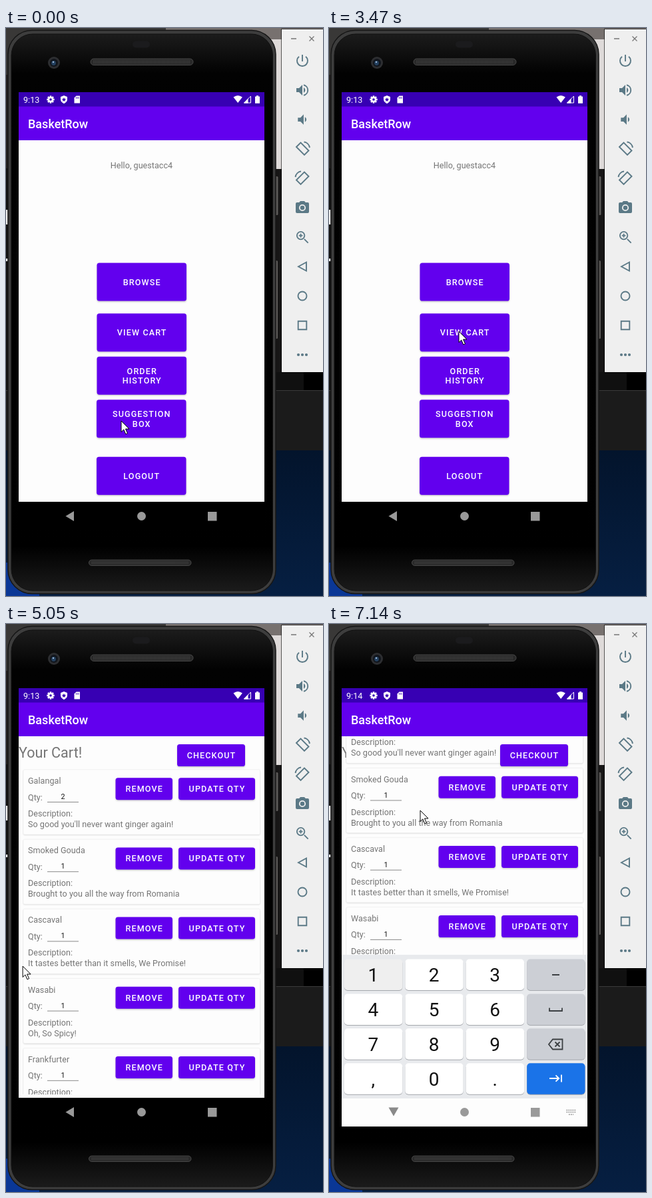
These frames come from a looping animation (476 px wide and 850 px high, 8000 ms). An HTML page:

```html
<!DOCTYPE html>
<html lang="en">
<head>
<meta charset="utf-8">
<title>Shopping cart demo</title>
<style>
  html, body { margin: 0; width: 100%; height: 100%; overflow: hidden; background: #000; }
  svg { display: block; width: 476px; height: 850px; }
  text { font-family: Roboto, Arial, sans-serif; white-space: pre; }
  .body { font-size: 12.57px; letter-spacing: .04px; fill: #757575; }
  .btn { font-size: 12.57px; font-weight: 500; letter-spacing: 1.12px; fill: #fff; text-anchor: middle; }
  .key { font-size: 28px; fill: #111; text-anchor: middle; }
  .line { fill: none; stroke: #5b7986; stroke-width: 1.9; }
</style>
</head>
<body>
<svg id="stage" viewBox="0 0 476 850"></svg>
<script>
const rect = (x, y, w, h, fill, extra = '') =>
  `<rect x="${x}" y="${y}" width="${w}" height="${h}" fill="${fill}" ${extra}/>`;
const circle = (x, y, r, fill, extra = '') =>
  `<circle cx="${x}" cy="${y}" r="${r}" fill="${fill}" ${extra}/>`;
const path = (d, fill, extra = '') => `<path d="${d}" fill="${fill}" ${extra}/>`;
const text = (x, y, s, cls, extra = '') => `<text x="${x}" y="${y}" class="${cls}" ${extra}>${s}</text>`;

// Raised button with one or more centred lines
const button = (x, y, w, h, ...lines) =>
  rect(x, y + 1.4, w, h, '#000', 'rx="3.6" opacity=".2" filter="url(#soft)"') +
  rect(x, y, w, h, '#6200ee', 'rx="3.6"') +
  lines.map((s, i) => text(x + w / 2 + .5, y + h / 2 + 4.6 + (i - (lines.length - 1) / 2) * 14.5, s, 'btn')).join('');

const appWindow = content =>
  rect(19, 96, 369, 613, '#fdfdfd') + rect(19, 709, 369, 43, '#000') + content +
  rect(19, 96, 369, 22, '#3700b3') + rect(19, 117.5, 369, 50.5, '#6200ee') +
  `<text x="33" y="150" fill="#fff" font-size="18" font-weight="500">BasketRow</text>`;

const home = appWindow(
  text(203.5, 210, 'Hello, guestacc4', 'body', 'text-anchor="middle"') +
  button(136.5, 351.6, 134.5, 57, 'BROWSE') +
  button(136.5, 427.2, 134.5, 57, 'VIEW CART') +
  `<g clip-path="url(#cartButton)">${circle(194, 454, 0, '#fff', 'id="ripple"')}</g>` +
  button(136.5, 491.7, 134.5, 57, 'ORDER', 'HISTORY') +
  button(136, 556.3, 134.5, 57, 'SUGGESTION', 'BOX') +
  button(136, 641.7, 134.5, 57, 'LOGOUT'));

const items = [
  ['Galangal', 2, "So good you'll never want ginger again!"],
  ['Smoked Gouda', 1, 'Brought to you all the way from Romania'],
  ['Cascaval', 1, 'It tastes better than it smells, We Promise!'],
  ['Wasabi', 1, 'Oh, So Spicy!'],
  ['Frankfurter', 1, '']
];
const card = ([name, qty, about], i) => `<g transform="translate(0 ${218 + i * 104.2})">` +
  rect(26, .8, 355.5, 97, '#000', 'rx="2" opacity=".17" filter="url(#soft)"') +
  rect(26, 0, 355.5, 97, '#fdfdfd', 'rx="2" stroke="#eee" stroke-width=".6"') +
  text(33, 21, name, 'body') + text(33, 45.5, 'Qty:', 'body') +
  `<text x="85.5" y="44" font-size="10.8" text-anchor="middle" fill="#111">${qty}</text>` +
  rect(62, 48, 47, 1, '#8a8a8a', i ? '' : 'id="underline"') +
  text(33, 70, 'Description:', 'body') + text(33, 86, about, 'body') +
  button(164.5, 12.2, 85.5, 33, 'REMOVE') + button(259, 12.2, 115, 33, 'UPDATE QTY') + '</g>';

const cart = appWindow(
  '<text x="19" y="200" font-size="21.55" fill="#757575">Your Cart!</text>' +
  `<g clip-path="url(#listClip)"><g id="list">${items.map(card).join('')}</g></g>` +
  button(257, 180, 102, 33, 'CHECKOUT'));

// Icons on a 24-unit grid, centred on x, y
const icon = (x, y, size, body) =>
  `<g transform="translate(${x} ${y}) scale(${size / 24}) translate(-12 -12)">${body}</g>`;
const slate = '#5b7986';
const speaker = 'M3 9v6h4l5 5V4L7 9z';
const rotate = '<path class="line" d="M2.5 9 9 2.5 21 14.5 14.5 21zM14 1.5A10 10 0 0 1 22.5 10"/>';
const zoom = '<path class="line" d="M15 15l6 6M6.5 9.5h6M9.5 6.5v6"/><circle class="line" cx="9.5" cy="9.5" r="6"/>';
const toolbar =
  rect(413, 1, 63, 515, '#000', 'opacity=".6"') + rect(414, 2, 62, 513, '#efefef') +
  path('M428 16h8M455.5 12.5l7 7M462.5 12.5l-7 7', 'none', 'stroke="#777" stroke-width="1.3"') +
  icon(445, 49, 24, '<path class="line" d="M12 3v10M7 5.8a8 8 0 1 0 10 0"/>') +
  icon(445, 93, 24, path(speaker + 'M14 8a4.5 4.5 0 0 1 0 8z', slate) +
    '<path class="line" d="M14 4.2a8 8 0 0 1 0 15.6"/>') +
  icon(445, 137, 23, `<g transform="translate(2)">${path(speaker + 'M14 8a4.5 4.5 0 0 1 0 8z', slate)}</g>`) +
  icon(445.5, 181, 24, rotate) +
  icon(445, 225, 24, `<g transform="matrix(-1 0 0 1 24 0)">${rotate}</g>`) +
  icon(445, 269, 24, path('M9 2 7.2 4H4a2 2 0 0 0-2 2v12a2 2 0 0 0 2 2h16a2 2 0 0 0 2-2V6a2 2 0 0 0-2-2h-3.2L15 2z', slate) +
    circle(12, 12, 4.2, slate, 'stroke="#efefef" stroke-width="1.8"')) +
  icon(445, 313, 23, zoom) +
  '<g class="line"><path d="M439 357l12-6.5v13z"/><circle cx="445" cy="401" r="6.5"/><path d="M438.7 438.7h12.6v12.6h-12.6z"/></g>' +
  [439, 445, 451].map(x => circle(x, 489, 2.1, slate)).join('');

const desktop =
  rect(0, 0, 476, 850, '#111') + rect(0, 0, 240, 70, '#393837') + rect(240, 0, 236, 17, '#77716f') +
  rect(0, 70, 6, 140, '#242120') + rect(0, 272, 4, 22, '#e8e8e8') + rect(0, 345, 4, 4, '#e8e8e8') +
  rect(395, 17, 20, 194, '#dedad9') + rect(395, 211, 20, 304, '#171616') +
  rect(400, 515, 47, 27, '#101010') + rect(447, 515, 29, 27, '#000') +
  rect(0, 542, 476, 90, '#1b1b1b') + rect(0, 542, 476, 1, '#3a3a3a') +
  rect(0, 632, 476, 218, 'url(#night)') + rect(0, 800, 50, 50, '#0a3796');

const slot = (x, y, w, h) => rect(x, y, w, h, '#292929', `rx="${h / 2}" stroke="#555" stroke-width=".8"`) +
  `<path d="M${x + 4} ${y + h / 2}h${w - 8}" stroke="#3c3c3c" stroke-width="${h - 4}" stroke-dasharray="1 1"/>`;
const phone =
  rect(402, 222, 6.5, 58, '#5c5a58', 'rx="1.5"') + rect(402, 348, 6, 117, '#5c5a58', 'rx="1.5"') +
  rect(3, 3.5, 402, 843, '#3d3d3d', 'rx="36" stroke="#161616" stroke-width="1.5"') +
  rect(8, 9, 392.5, 833, 'url(#glass)', 'rx="32" stroke="#101010"') +
  rect(190, 19.5, 26, 10, '#1b1b1d', 'rx="5"') +
  circle(72, 52, 9, '#2d2e31') + circle(72, 52, 6, '#11151c') + circle(71.5, 52.5, 3.4, '#23405f') + circle(71, 51, 1.2, '#9db8d8') +
  slot(127, 46, 154, 9.5) + slot(124.5, 796, 153.5, 8.5) + rect(19, 96, 369, 656, '#000');

const gearTeeth = [0, 45, 90, 135].map(a => rect(65.7, 101.3, 2.6, 11.4, '#fff', `transform="rotate(${a} 67 107)"`)).join('');
const status =
  '<text id="clock" x="26" y="112" font-size="12.6" fill="#fff"></text>' +
  gearTeeth + circle(67, 107, 2.9, '#3700b3', 'stroke="#fff" stroke-width="2.2"') +
  path('M87 101l5 2v3.6q0 4.3-5 6.6-5-2.3-5-6.6V103z', '#fff') +
  path('M87 104l1 2.1 2.2.2-1.7 1.5.5 2.2-2-1.2-2 1.2.5-2.2-1.7-1.5 2.2-.2z', '#3700b3') +
  path('M105.5 101.5h5.5v11h-8.5v-8z', '#fff') +
  path('M105.3 103.5v2M107.2 103.5v2M109 103.5v2', 'none', 'stroke="#3700b3"') +
  path('M341.5 103.5q6.7-5 13.4 0l-6.7 8.5z', '#fff') +
  path('M357.5 112h10v-10z', 'none', 'stroke="#fff"') + path('M357 112.5h6.5v-7z', '#fff') +
  path('M376 101h3v1.4h2v10.4h-7v-10.4h2z', '#fff');

const dots = '<path id="imeIcon" d="M356.5 727.5h14M356.5 730.5h14M360 734h7" stroke="#8a8a8a" stroke-width="1.6" stroke-dasharray="1.7 1.3" fill="none"/>';
const navHome = circle(203.5, 730.5, 6.5, '#999') + rect(303, 724, 13.5, 13.5, '#999');
const nav = path('M89.5 730.5 102 723v15z', '#999') + navHome;

const keyRow = (row, r) => row.map((label, c) => {
  const x = 23 + c * 91.4, y = 501.5 + r * 51.9;
  const fill = c == 3 ? (r == 3 ? '#1a73e8' : '#cccfd5') : r + c ? '#fff' : '#efefef';
  return rect(x, y + 1, 87.3, 46.5, '#a5a8ad', 'rx="5"') + rect(x, y, 87.3, 46.5, fill, 'rx="5"') +
    text(x + 43.3, y + 33.5, label, 'key');
}).join('');
const keyboard =
  rect(19, 495, 369, 215, '#e8eaed') +
  ['123', '456', '789', ',0.'].map((s, r) => keyRow([...s, ''], r)).join('') +
  '<g fill="none" stroke="#3c4043" stroke-width="1.8"><path d="M335 525h11M331 574.5v4.5h19v-4.5"/>' +
  '<path d="M336 621.5h14.5v15H336l-6-7.5zM339.5 625.5l7 7M346.5 625.5l-7 7"/>' +
  '<path stroke="#fff" d="M331 680h14M340.5 675.3l4.8 4.7-4.8 4.7M349 674.5v11"/></g>' +
  rect(19, 710, 369, 42, '#fdfdfd') + path('M89.5 723.5h15L97 736.5z', '#8a8a8a') + navHome;

document.getElementById('stage').innerHTML = `
<defs>
  <filter id="soft"><feGaussianBlur stdDeviation="1"/></filter>
  <linearGradient id="glass" x2="0" y2="1"><stop stop-color="#1c1c1c"/><stop offset=".07" stop-color="#020202"/>
    <stop offset=".92"/><stop offset="1" stop-color="#1b1b1b"/></linearGradient>
  <linearGradient id="night" x2="0" y2="1"><stop stop-color="#03142c"/><stop offset="1" stop-color="#061f42"/></linearGradient>
  <clipPath id="screenClip"><rect x="19" y="96" width="369" height="656"/></clipPath>
  <clipPath id="listClip"><rect id="listBox" x="19" y="168" width="369"/></clipPath>
  <clipPath id="cartButton"><rect x="136.5" y="427.2" width="134.5" height="57" rx="3.6"/></clipPath>
</defs>
${desktop}${phone}
<g clip-path="url(#screenClip)">
  <g id="home">${home}</g>${rect(19, 96, 369, 656, '#000', 'id="dim"')}
  <g id="cart">${cart}</g>${status}${nav}
  <g id="keyboard">${keyboard}</g>${dots}
  <path id="handle" d="M88.5 264l6.7 6.2a9.3 9.3 0 1 1-13.4 0z" fill="#00d9c3"/>
</g>
${toolbar}
<g id="pointer"><circle id="press" cx="-1" r="12" fill="#c8a860"/>
  <path id="arrow" d="M0 0V16.5l3.8-3.6 3 6.9 2.7-1.2-3-6.6H12z" stroke="#000" stroke-width="1"/></g>`;

const el = id => document.getElementById(id);
const set = (id, attrs) => { for (const k in attrs) el(id).setAttribute(k, attrs[k]); };
const show = (id, on) => set(id, { visibility: on ? 'visible' : 'hidden' });
const ramp = (t, a, b) => Math.min(1, Math.max(0, (t - a) / (b - a)));
const zoomed = s => `translate(203.5 424) scale(${s}) translate(-203.5 -424)`;
const smooth = u => u * u * (3 - 2 * u);
const cubic = (s, a, b, c, d) =>
  (1 - s) ** 3 * a + 3 * (1 - s) ** 2 * s * b + 3 * (1 - s) * s * s * c + s ** 3 * d;

// Window easing: a very fast start with a long settling tail
function windowEase(u) {
  const [xs, ys] = u < 1 / 6
    ? [[0, .05, .1333, 1 / 6], [0, 0, .06, .4]]
    : [[1 / 6, .2083, .25, 1], [.4, .82, 1, 1]];
  let lo = 0, hi = 1;
  for (let i = 0; i < 20; i++) {
    const mid = (lo + hi) / 2;
    if (cubic(mid, ...xs) < u) lo = mid; else hi = mid;
  }
  return cubic(hi, ...ys);
}

// Pointer strokes: start, end, then the curve's x and y control values
const strokes = [
  [180, 250, [173, 175, 177, 178], [588, 587, 586, 585]],
  [450, 1200, [178, 75, 310, 195], [585, 550, 470, 454]],
  [4950, 5770, [1, 200, 245, 106], [516, 490, 320, 265]],
  [6050, 6500, [106, 116, 127, 137], [265, 270, 274, 279]]
];
function pointerAt(t) {
  const [a, b, xs, ys] = strokes.filter(s => s[0] <= t).pop() || strokes[0];
  const s = smooth(ramp(t, a, b));
  return [cubic(s, ...xs), cubic(s, ...ys)];
}

function draw(now) {
  const t = now % 8000;
  set('ripple', { r: 10 + 85 * smooth(ramp(t, 2970, 3250)), opacity: t < 2970 ? 0 : .24 * (1 - ramp(t, 3200, 3450)) });

  const open = windowEase(ramp(t, 3470, 3870));
  set('home', { transform: zoomed(1 + .05 * open) });
  set('dim', { opacity: .12 * open });
  set('cart', { transform: zoomed(.85 + .15 * open), opacity: ramp(t, 3505, 3555) });

  const editing = t >= 6080, resized = t >= 6640;
  set('list', { transform: `translate(0 ${resized ? -106.7 : 0})` });
  set('listBox', { height: (resized ? 495 : 704) - 168 });
  set('underline', { fill: editing ? '#03dac5' : '#8a8a8a', height: editing ? 1.8 : 1 });
  show('handle', editing && t < 6740);
  show('imeIcon', t >= 6540);

  const rise = 1 - (1 - ramp(t, 6760, 7090)) ** 2;
  set('keyboard', { transform: `translate(0 ${(1 - rise) * 65})`, opacity: rise });
  el('clock').textContent = t < 6900 ? '9:13' : '9:14';

  const pressed = (t >= 2920 && t < 3080) || (t >= 5820 && t < 5980);
  set('pointer', { transform: `translate(${pointerAt(t)})` });
  show('pointer', t < 3760 || t >= 4950);
  set('press', { opacity: pressed ? .75 : 0 });
  set('arrow', { fill: pressed ? '#ffff70' : '#fff' });
}

function loop(now) {
  draw(now);
  requestAnimationFrame(loop);
}
draw(0);
requestAnimationFrame(loop);
</script>
</body>
</html>
```
